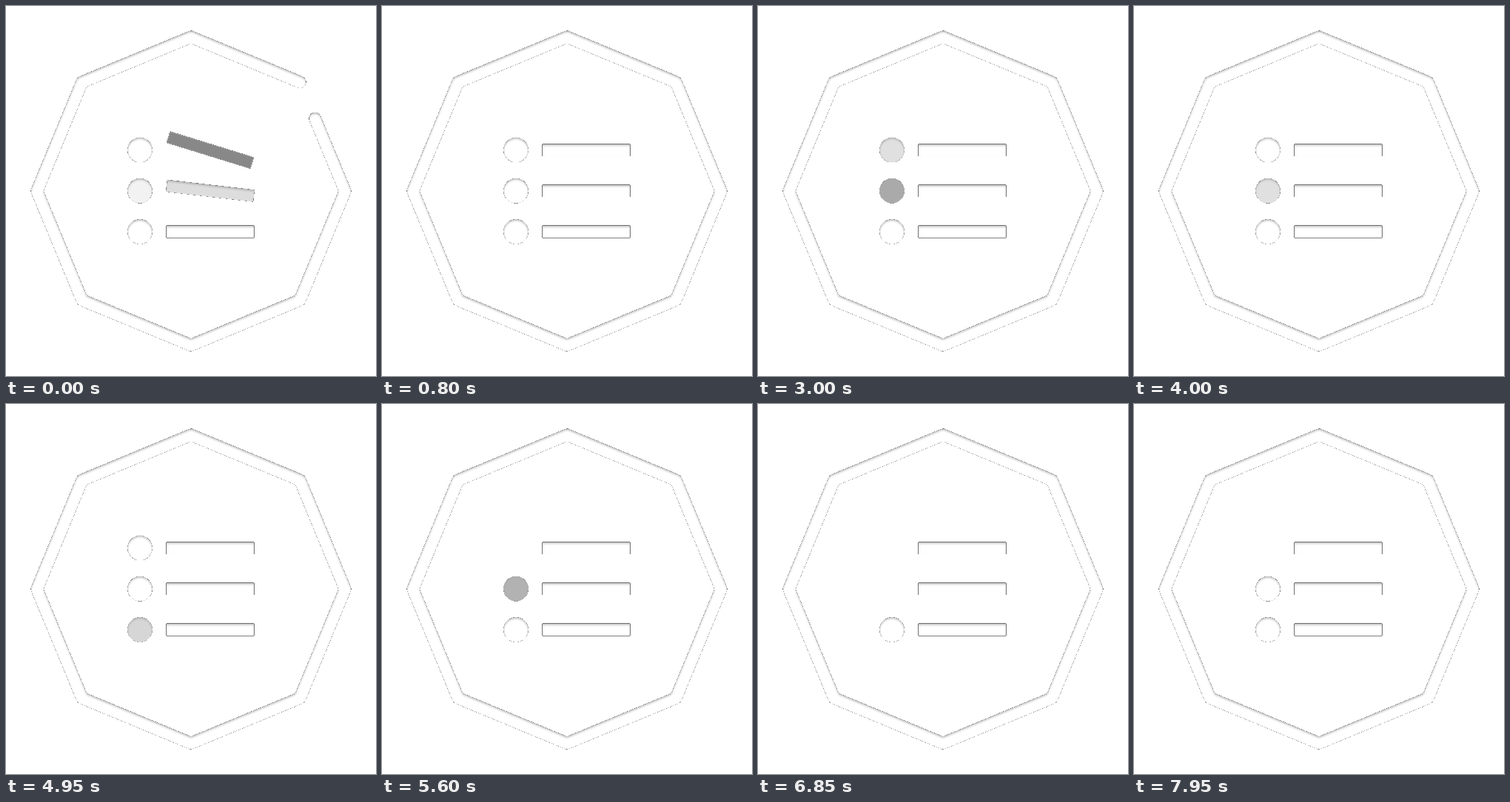
Animation, 500 px wide and 500 px high, one loop 8000 ms. Source, as an HTML page:

```html
<!DOCTYPE html>
<html lang="en">
<head>
<meta charset="utf-8">
<title>List badge</title>
<style>
  html, body { margin: 0; width: 100%; height: 100%; overflow: hidden; background: #fff; }
  svg { display: block; width: 100vw; height: 100vh; }
</style>
</head>
<body>
<svg viewBox="0 0 500 500">
  <defs>
    <filter id="engrave" filterUnits="userSpaceOnUse" x="0" y="0" width="500" height="500" color-interpolation-filters="sRGB">
      <!-- soft shadow falling inside the shape from its top edge -->
      <feFlood flood-color="#000" flood-opacity="1" result="ink"/>
      <feComposite in="ink" in2="SourceAlpha" operator="out"/>
      <feGaussianBlur stdDeviation="1.7"/>
      <feOffset dy="1.6"/>
      <feComposite in2="SourceAlpha" operator="in"/>
      <feComponentTransfer result="shade"><feFuncA type="linear" slope=".27"/></feComponentTransfer>
      <!-- hairline on partly covered pixels -->
      <feComponentTransfer in="SourceAlpha" result="edge">
        <feFuncA type="discrete" tableValues="0 0 0 0 .5 .4 .25 0"/>
      </feComponentTransfer>
      <feMerge>
        <feMergeNode in="SourceGraphic"/>
        <feMergeNode in="shade"/>
        <feMergeNode in="edge"/>
      </feMerge>
    </filter>
  </defs>
  <g id="base" filter="url(#engrave)" fill="#fff"></g>
  <g id="tint"></g>
</svg>
<script>
const LOOP = 8000, STEP = 50, PULSE = 400;
const base = document.getElementById('base');
const tint = document.getElementById('tint');

function add(parent, tag, attrs) {
  const el = document.createElementNS('http://www.w3.org/2000/svg', tag);
  for (const k in attrs) el.setAttribute(k, attrs[k]);
  return parent.appendChild(el);
}

// Octagon, traced counter-clockwise from its upper right corner
const corners = Array.from({ length: 9 }, (_, i) => {
  const a = -Math.PI / 4 * (i + 1);
  return [250 + 208.2 * Math.cos(a), 250 + 208.2 * Math.sin(a)].map(v => v.toFixed(2));
});
const ring = add(base, 'path', {
  d: 'M' + corners.join('L'), pathLength: 8, fill: 'none', stroke: '#fff',
  'stroke-width': 16.8, 'stroke-linecap': 'round', 'stroke-linejoin': 'round'
});

// Bars settle from the bottom row up: [top, height, settle time]
const bars = [[186.4, 16.6, 400], [241.4, 16.6, 200], [296.4, 17.2, 0]].map(([y, h, end]) => ({
  end, cy: y + h / 2,
  body: add(base, 'rect', { x: 216.4, y, width: 119.2, height: h, rx: 0.6 }),
  cover: add(tint, 'rect', { x: 217, y: y + 0.6, width: 118, height: h - 1, fill: '#888' })
}));

// Dot pulses as start times; "off" pulses end hidden, "on" pulses bring the dot back
const dots = [
  { cy: 194.6, starts: [250, 1150, 2100, 2950, 5050, 5800, 6450, 7000, 7550], off: [5050, 6450, 7550], on: [5800, 7000] },
  { cy: 249.8, starts: [-20, 1050, 1900, 2750, 3400, 3950, 5250, 5750, 6400, 7550], off: [6400], on: [7550] },
  { cy: 305, starts: [400, 950, 1700, 2550, 3450, 4400, 4850, 5850, 6450, 7000, 7550], off: [], on: [] }
].map(dot => ({
  ...dot,
  body: add(base, 'circle', { cx: 181, cy: dot.cy, r: 17 }),
  cover: add(tint, 'circle', { cx: 181, cy: dot.cy, r: 16.7, fill: '#aaa' })
}));

const pulseKeys = [[0, 0], [50, 0.37], [150, 0.6], [250, 1], [350, 0.9], [400, 0]];

function pulse(p) {
  if (p <= 0 || p >= PULSE) return 0;
  const i = pulseKeys.findIndex(k => k[0] >= p);
  const [t0, v0] = pulseKeys[i - 1], [t1, v1] = pulseKeys[i];
  return v0 + (v1 - v0) * (p - t0) / (t1 - t0);
}

function drawDot(dot, t) {
  let start = -Infinity;
  for (const s of dot.starts) if (s <= t) start = s;
  const p = t - start;
  let shown = true, level = pulse(p);
  if (dot.off.includes(start)) shown = p < PULSE;
  if (dot.on.includes(start)) level = Math.max(0, 1 - p / 350);
  dot.body.setAttribute('visibility', shown ? 'visible' : 'hidden');
  dot.cover.setAttribute('opacity', shown ? level : 0);
}

function drawBar(bar, t) {
  const left = Math.max(0, bar.end - t) / 400;
  const turn = `rotate(${17.2 * left ** 1.4} 276 ${bar.cy})`;
  bar.body.setAttribute('transform', turn);
  bar.cover.setAttribute('transform', turn);
  bar.cover.setAttribute('opacity', left ** 1.8);
}

function draw(t) {
  const gap = 0.335 * Math.max(0, 1 - t / 300) ** 2;
  if (gap > 0) ring.setAttribute('stroke-dasharray', `${8 - gap} 9`);
  else ring.removeAttribute('stroke-dasharray');
  bars.forEach(bar => drawBar(bar, t));
  dots.forEach(dot => drawDot(dot, t));
}

const began = performance.now();
function tick() {
  const t = (performance.now() - began) % LOOP;
  draw(Math.floor(t / STEP) * STEP);
  requestAnimationFrame(tick);
}
tick();
</script>
</body>
</html>
```
